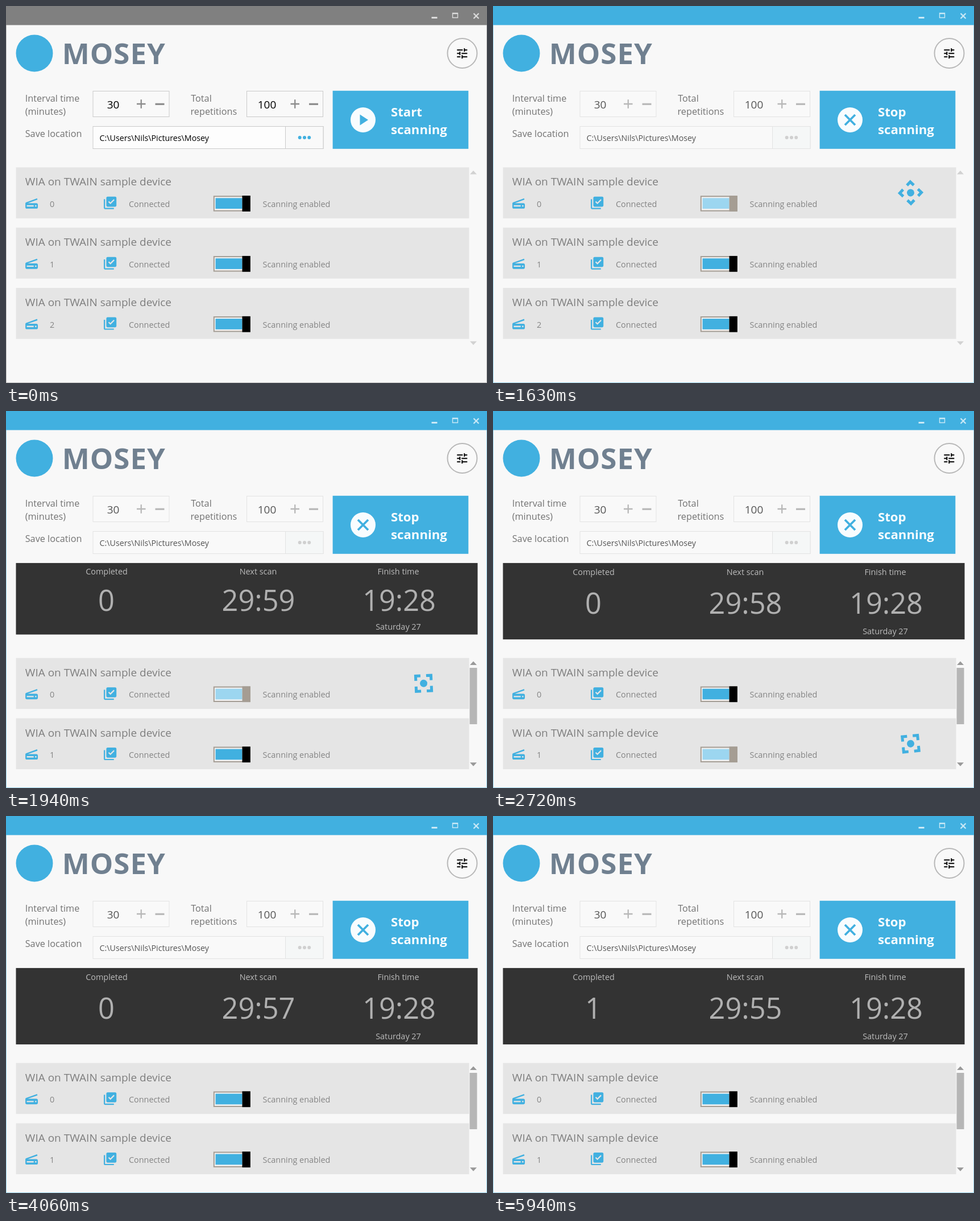
Animation, 846 px wide and 662 px high, one loop 6030 ms. Source, as an HTML page:

```html
<!DOCTYPE html>
<html lang="en">
<head>
<meta charset="utf-8">
<title>Scan scheduler</title>
<style>
  html, body { margin: 0; height: 100%; overflow: hidden; background: #f8f8f8; }
  svg { display: block; width: 846px; height: 662px; font-family: "Open Sans", "Noto Sans", sans-serif; }
</style>
</head>
<body>
<svg id="stage" viewBox="0 0 846 662"></svg>
<script>
const LOOP = 6030;
const BLUE = '#41b0e0';
const PRESS = 450, START = 700, PANEL = 1690, DONE = 5230;
const SCAN_TIME = 1430, SPIN = 0.143;   // ms per device, degrees per ms
const PANEL_TOP = 266.7, PANEL_HEIGHT = 134.6, PANEL_GROW = 338;

const ICONS = {
  tune: 'M3 17v2h6v-2H3zM3 5v2h10V5H3zm10 16v-2h8v-2h-8v-2h-2v6h2zM7 9v2H3v2h4v2h2V9H7zm14 4v-2H11v2h10zm-6-4h2V7h4V5h-4V3h-2v6z',
  scanner: 'M19.8 10.7L4.2 5l-.7 1.9L17.6 12H5c-1.1 0-2 .9-2 2v4c0 1.1.9 2 2 2h14c1.1 0 2-.9 2-2v-5.5c0-.8-.5-1.6-1.2-1.8zM7 17H5v-2h2v2zm12 0H9v-2h10v2z',
  check: 'M20 2H8c-1.1 0-2 .9-2 2v12c0 1.1.9 2 2 2h12c1.1 0 2-.9 2-2V4c0-1.1-.9-2-2-2zm-7.53 12L9 10.5l1.4-1.41 2.07 2.08L17.6 6 19 7.41 12.47 14zM4 6H2v14c0 1.1.9 2 2 2h14v-2H4V6z'
};

const rect = (x, y, w, h, fill, more = '') =>
  `<rect x="${x}" y="${y}" width="${w}" height="${h}" fill="${fill}" ${more}/>`;
const circle = (x, y, r, fill, more = '') =>
  `<circle cx="${x}" cy="${y}" r="${r}" fill="${fill}" ${more}/>`;
const path = (d, fill, more = '') => `<path d="${d}" fill="${fill}" ${more}/>`;
const line = (d, color, width) => path(d, 'none', `stroke="${color}" stroke-width="${width}"`);
const text = (x, y, size, fill, str, more = '') =>
  `<text x="${x}" y="${y}" font-size="${size}" fill="${fill}" ${more}>${str}</text>`;
const centered = (x, y, size, fill, str, more = '') =>
  text(x, y, size, fill, str, 'text-anchor="middle" ' + more);
const icon = (name, x, y, sx, sy, fill) =>
  path(ICONS[name], fill, `transform="translate(${x} ${y}) scale(${sx} ${sy})"`);

function frame(active) {
  const color = active ? BLUE : '#808080';
  return rect(0.5, 0.5, 845, 661, '#f8f8f8', `stroke="${color}" stroke-opacity=".5"`) +
    rect(0, 0, 846, 33.5, color) +
    '<g opacity=".72">' +
    rect(748.5, 19, 10, 3, '#fff') +
    line('M785.5 12.5h9v8h-9zM785 13.5h10', '#fff', 1.4) +
    line('M822.5 13l9 9m0-9l-9 9', '#fff', 2.2) + '</g>';
}

function header() {
  return circle(50, 83, 32.5, BLUE) +
    text(98.7, 102, 51, '#708090', 'MOSEY', 'font-weight="700" letter-spacing="1"') +
    circle(802.5, 83, 26, '#f9f9f9', 'stroke="#b8b8b8" stroke-width="2"') +
    icon('tune', 790.3, 71.3, 1, 1, '#000');
}

function stepper(x, value, locked) {
  const sign = locked ? '#b8b8b8' : '#8c8c8c';
  return rect(x + 0.5, 149.5, 134, 45, '#f9f9f9', `stroke="${locked ? '#e3e3e3' : '#cacaca'}"`) +
    centered(x + 36, 179.5, 19, locked ? '#555' : '#000', value) +
    line(`M${x + 77.5} 172h15.5m-7.75-7.75v15.5`, sign, 2.3) +
    line(`M${x + 110} 172.3h16`, sign, 3.2);
}

function settings(locked) {
  const label = (x, y, str) => text(x, y, 16.25, '#737373', str);
  const border = `stroke="${locked ? '#e3e3e3' : '#cacaca'}"`;
  return label(33.7, 168.3, 'Interval time') + label(33.7, 190.7, '(minutes)') +
    label(325.2, 168.3, 'Total') + label(324.5, 190.7, 'repetitions') + label(33.7, 230.3, 'Save location') +
    stepper(152.5, '30', locked) + stepper(423, '100', locked) +
    rect(153, 211.5, 405, 39, locked ? '#f9f9f9' : '#fdfdfd', border) +
    rect(491.5, 211.5, 66.5, 39, locked ? '#f5f7f7' : '#f9f9f9', border) +
    text(164.5, 237, 14.25, locked ? '#555' : '#000', 'C:\\Users\\Nils\\Pictures\\Mosey') +
    [516.7, 525, 533.2].map(x => circle(x, 231, 3, locked ? '#d0d0d0' : BLUE)).join('');
}

function mainButton(running) {
  const word = (y, str) => text(677, y, 22.2, '#f8fcfe', str, 'font-weight="700"');
  return rect(574.6, 148.8, 238.7, 102, BLUE) + circle(628, 200, 22, '#f8fcfe') +
    (running ? line('M619 191l18 18m0-18l-18 18', BLUE, 3.8) : path('M622.5 190.5v19l14.5-9.5z', BLUE)) +
    word(193.5, running ? 'Stop' : 'Start') + word(225.3, 'scanning');
}

function focusMark(y, angle) {
  const corner = 'M-13.5 -5V-13.5H-5';
  const corners = [0, 90, 180, 270].map(a =>
    path(corner, 'none', `transform="rotate(${a})" stroke="${BLUE}" stroke-width="5"`)).join('');
  return `<g transform="translate(734.5 ${y}) rotate(${angle})">${corners}${circle(0, 0, 6.5, BLUE)}</g>`;
}

function device(index, y, t) {
  const elapsed = t - START - index * SCAN_TIME;
  const busy = elapsed >= 0 && elapsed < SCAN_TIME;
  const note = (x, str) => text(x, y + 69.5, 14.4, '#848484', str);
  return rect(17.5, y, 797, 89.5, '#e5e5e5') +
    text(33.8, y + 32, 19, '#7e7e7e', 'WIA on TWAIN sample device') +
    icon('scanner', 59.7, y + 48.5, -1.22, 1.2, BLUE) + note(77, index) +
    icon('check', 169.8, y + 49.3, 1.11, 1.1, BLUE) + note(216, 'Connected') +
    rect(365.8, y + 50.9, 63, 25.4, '#f2f2f2', 'stroke="#a59d94" stroke-width="2"') +
    rect(368.5, y + 54, 47, 18.7, busy ? '#9cd6f0' : BLUE) +
    rect(415.5, y + 49.7, 14.3, 27.8, busy ? '#a59d93' : '#000') +
    note(451.6, 'Scanning enabled') +
    (busy ? focusMark(y + 44.6, elapsed * SPIN) : '');
}

function deviceList(t) {
  const open = t >= PANEL;
  const top = open ? 433.7 : 283.3, bottom = open ? 620.5 : 592;
  const arrows = open ? '#999' : '#d2d2d2';
  let out = '';
  for (let i = 0; i < (open ? 2 : 3); i++) out += device(i, top + i * 105.9, t);
  return out + path(`M816 ${top + 12.3}h12l-6-6.5z`, arrows) + path(`M816 ${bottom - 3.3}h12l-6 6.5z`, arrows) +
    (open ? rect(815.5, 451, 13, 99, '#b6b6b6') : '');
}

function statusPanel(t) {
  if (t < PANEL) return '';
  const p = Math.min(1, (t - PANEL) / PANEL_GROW);
  const height = PANEL_HEIGHT * (1 - (1 - p) ** 2);
  const lack = PANEL_HEIGHT - height;
  const seconds = 59 - Math.max(0, Math.floor((t - 1230) / 1000));
  const label = (x, str) => centered(x, 288.3 - lack * 0.1, 14.4, '#bcbcbc', str);
  const digits = (x, str) => centered(x, 356.3 - lack * 0.55, 50.5, '#b0b0b0', str);
  return `<clipPath id="panel">${rect(17.3, PANEL_TOP, 812.4, height, '#000')}</clipPath><g clip-path="url(#panel)">` +
    rect(17.3, PANEL_TOP, 812.4, PANEL_HEIGHT, '#333') +
    label(177, 'Completed') + label(443.5, 'Next scan') + label(690, 'Finish time') +
    digits(176.5, t < DONE ? 0 : 1) + digits(444, '29:' + seconds) + digits(691.5, '19:28') +
    centered(690, 391.7 - lack * 0.9, 14.4, '#bcbcbc', 'Saturday 27') + '</g>';
}

const stage = document.getElementById('stage');
function draw() {
  const t = performance.now() % LOOP;
  const scanning = t >= START;
  stage.innerHTML = frame(scanning) + header() + settings(scanning) + mainButton(t >= PRESS) +
    deviceList(t) + statusPanel(t);
  requestAnimationFrame(draw);
}
draw();
</script>
</body>
</html>
```
